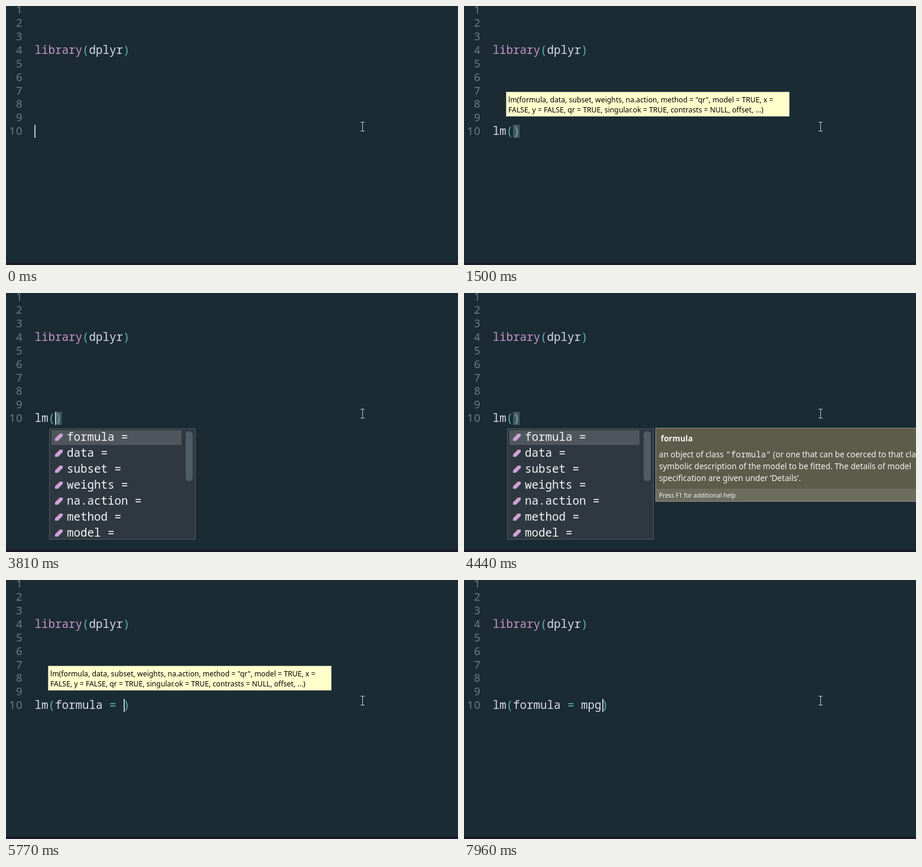
An HTML page that plays this animation: 765x438 px, repeating every 8000 ms.

```html
<!DOCTYPE html>
<html lang="en">
<head>
<meta charset="utf-8">
<title>Code completion</title>
<style>
  html, body { margin: 0; width: 100%; height: 100%; overflow: hidden; background: #1b2b34; }
  svg { display: block; width: 765px; height: 438px; }
  text { white-space: pre; }
  .code { font: 500 19.2px "Noto Sans Mono", monospace; fill: #d8dee9; }
  .gutter { font: 500 18.4px "Noto Sans", sans-serif; letter-spacing: 1px; fill: #6d7b86; text-anchor: end; }
  .keyword { fill: #c594c5; }
  .operator { fill: #5fb3b3; }
  .hint { font: 12.24px "Noto Sans", sans-serif; fill: #000; }
  .option { fill: #f4f5f6; }
  .help { font: 13.6px "Noto Sans", sans-serif; fill: #f4f4f0; }
  .help .title { font-size: 13.5px; font-weight: 700; }
  .help .mono { font: 14.2px "Noto Sans Mono", monospace; }
  .help .foot { font-size: 10.16px; }
</style>
</head>
<body>
<svg viewBox="0 0 765 438">
  <rect width="765" height="438" fill="#1b2b34"/>
  <rect y="434" width="765" height="4" fill="#1a1b2c"/>
  <g id="gutter"></g>
  <text class="code" x="48.4" y="81"><tspan class="keyword">library</tspan><tspan class="operator">(</tspan>dplyr<tspan class="operator">)</tspan></text>
  <rect id="match" x="83" y="201" width="11" height="22" fill="#4b585f"/>
  <text id="line" class="code" x="48.4" y="218"></text>
  <rect id="caret" y="201" width="2" height="22" fill="#c0c5ce"/>

  <g id="hint" class="hint">
    <rect x="71.5" y="145.5" width="479" height="41" fill="#ffffcc" stroke="#b9b99a"/>
    <text x="75" y="163">lm(formula, data, subset, weights, na.action, method = "qr", model = TRUE, x =</text>
    <text x="75" y="180">FALSE, y = FALSE, qr = TRUE, singular.ok = TRUE, contrasts = NULL, offset, ...)</text>
  </g>

  <g id="list">
    <rect x="73.5" y="229.5" width="247" height="187" fill="#2f3840" stroke="#4d5b63"/>
    <rect x="77" y="232" width="220" height="25" fill="#4f565d"/>
    <rect x="304" y="234" width="12" height="84" rx="5" fill="#4f5b66"/>
    <g id="options"></g>
  </g>

  <g id="help" class="help">
    <rect x="324.5" y="228.5" width="450" height="124" fill="#5c5c4b"/>
    <rect x="325" y="331" width="450" height="21" fill="#6d6d5e"/>
    <rect x="324.5" y="228.5" width="450" height="124" fill="none" stroke="#92928a"/>
    <text class="title" x="333" y="251">formula</text>
    <text x="330" y="278">an object of class <tspan class="mono">"formula"</tspan> (or one that can be coerced to that class): a</text>
    <text x="330" y="298">symbolic description of the model to be fitted. The details of model</text>
    <text x="330" y="318">specification are given under ‘Details’.</text>
    <text class="foot" x="330" y="346">Press F1 for additional help</text>
  </g>

  <path d="M600 196.500h7M603.5 196.500v15M600 211.500h7" fill="none" stroke="#c9cfd2"/>
</svg>
<script>
  const LOOP = 8000, COLUMN = 11.6, LEFT = 48.4;
  const byId = id => document.getElementById(id);

  byId('gutter').innerHTML = Array.from({ length: 10 }, (_, i) =>
    `<text class="gutter" x="28.5" y="${Math.round(218 - (9 - i) * 22.83)}">${i + 1}</text>`).join('');

  byId('options').innerHTML = ['formula', 'data', 'subset', 'weights', 'na.action', 'method', 'model']
    .map((name, i) => `<g transform="translate(0 ${i * 27})">
      <path d="M83 246l8-8h5v4l-8 8h-5z" fill="#cda2d6"/>
      <text class="code option" x="103" y="250">${name} =</text></g>`).join('');

  // Each entry: start time, then only what changes from then on.
  const steps = [
    [0, { text: '', column: 0, caret: true, match: false, hint: false, list: false, help: false }],
    [100, { text: 'l', column: 1 }],
    [230, { text: 'lm', column: 2 }],
    [790, { caret: false }],
    [870, { text: 'lm()', column: 3, caret: true }],
    [950, { match: true, hint: true }],
    [1500, { caret: false }],
    [1880, { caret: true }],
    [2430, { caret: false }],
    [2890, { caret: true }],
    [3120, { hint: false, list: true }],
    [3500, { caret: false }],
    [3810, { caret: true }],
    [3890, { help: true }],
    [4440, { caret: false }],
    [4740, { text: 'lm(formula = )', column: 13, caret: true, match: false, hint: true, list: false, help: false }],
    [5370, { caret: false }],
    [5770, { caret: true }],
    [6310, { hint: false }],
    [6380, { caret: false }],
    [6780, { caret: true }],
    [7180, { text: 'lm(formula = m)', column: 14 }],
    [7250, { text: 'lm(formula = mp)', column: 15 }],
    [7880, { caret: false }],
    [7960, { text: 'lm(formula = mpg)', column: 16, caret: true }]
  ];

  let shown = -1;
  function draw(now) {
    const time = now % LOOP;
    const index = steps.filter(([start]) => start <= time).length - 1;
    if (index !== shown) {
      shown = index;
      const state = Object.assign({}, ...steps.slice(0, index + 1).map(step => step[1]));
      byId('line').innerHTML = state.text.replace(/[()=]/g, '<tspan class="operator">$&</tspan>');
      byId('caret').setAttribute('x', Math.floor(LEFT + state.column * COLUMN));
      for (const id of ['caret', 'match', 'hint', 'list', 'help'])
        byId(id).style.display = state[id] ? '' : 'none';
    }
  }

  const origin = performance.now();
  function tick() {
    draw(performance.now() - origin);
    requestAnimationFrame(tick);
  }
  tick();
</script>
</body>
</html>
```
